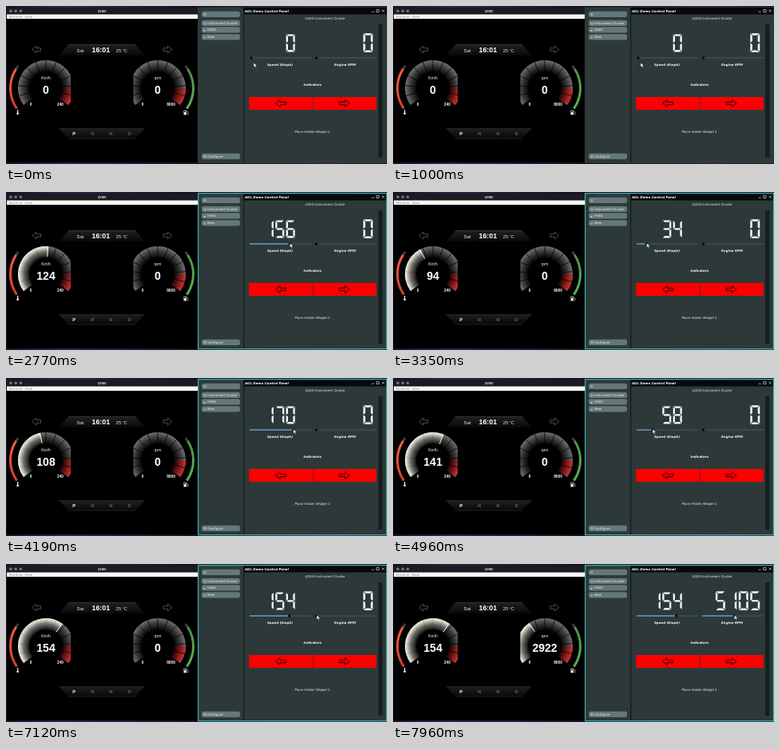
These frames come from a looping animation (477x198 px, 8000 ms). An HTML page:

```html
<!DOCTYPE html>
<html lang="en">
<head>
<meta charset="utf-8">
<title>Instrument cluster demo</title>
<style>
html, body { margin: 0; width: 100%; height: 100%; overflow: hidden; background: #0b0a12; }
svg { display: block; width: 100vw; height: 100vh; font-family: "Liberation Sans", Arial, sans-serif; }
.ui { font-family: "DejaVu Sans", sans-serif; font-size: 4px; }
.mid { text-anchor: middle; }
.bold { font-weight: bold; }
.it { font-style: italic; }
</style>
</head>
<body>
<svg id="stage" viewBox="0 0 477 198">
  <defs>
    <linearGradient id="wall"><stop offset="0" stop-color="#171129"/><stop offset=".15" stop-color="#33204a"/><stop offset=".5" stop-color="#141124"/><stop offset=".85" stop-color="#33204a"/><stop offset="1" stop-color="#1d1630"/></linearGradient>
    <linearGradient id="plate" x2="0" y2="1"><stop offset="0" stop-color="#202020"/><stop offset="1" stop-color="#080808"/></linearGradient>
    <linearGradient id="heat" x2="0" y2="1"><stop offset="0" stop-color="#ff6048"/><stop offset="1" stop-color="#d63c2c"/></linearGradient>
    <linearGradient id="fuel" x2="0" y2="1"><stop offset="0" stop-color="#4b9348"/><stop offset="1" stop-color="#5bb057"/></linearGradient>
    <clipPath id="kmhClip"><path d="M0 60H81V140H0Z"/></clipPath>
    <clipPath id="rpmClip"><path d="M159.5 60H240V140H159.5Z"/></clipPath>
  </defs>
  <rect width="477" height="198" fill="url(#wall)"/>

  <g id="cluster">
    <rect x="1" y="2" width="239" height="194" fill="#000"/>
    <rect x="1" y="2" width="239" height="8.5" fill="#1b1b20"/>
    <g fill="#75757c"><circle cx="6" cy="6.2" r="1.8"/><circle cx="12.2" cy="6.2" r="1.8"/><circle cx="18.4" cy="6.2" r="1.8"/></g>
    <text class="mid bold" x="120.2" y="7.6" fill="#ddd" font-family="Inter, sans-serif" font-size="3.5">QEMU</text>
    <rect x="1" y="10.5" width="239" height="5.5" fill="#f8f8f8"/>
    <text class="ui" y="14.7" fill="#8a8a8a"><tspan x="3.7">Machine</tspan><tspan x="23.5">View</tspan></text>

    <path d="M66 62 78 48.5H162L174 62Z" fill="url(#plate)"/>
    <path d="M78 48.5H162" stroke="#484848" stroke-width=".6"/>
    <path d="M66 153H174L162 166H78Z" fill="url(#plate)"/>
    <path d="M78 166H162" stroke="#383838" stroke-width=".6"/>
    <g class="mid" fill="#eee">
      <text x="93" y="57.7" font-size="6">Sat</text>
      <text class="bold" x="118.8" y="58.2" font-size="8.8" fill="#fff">16:01</text>
      <text x="144.8" y="57.5" font-size="5.6">25 °C</text>
    </g>
    <g class="mid bold" font-size="5.8" fill="#626262">
      <text x="85.3" y="161.7" fill="#fff">P</text><text x="108.3" y="161.7">R</text><text x="131.3" y="161.7">N</text><text x="154.7" y="161.7">D</text>
    </g>
    <g fill="none" stroke="#606060" stroke-width=".8" stroke-linejoin="round">
      <path d="M32.7 54.5 38 50V52.7H43.5V56.3H38V59Z"/>
      <path d="M207.7 54.5 202.4 50V52.7H196.9V56.3H202.4V59Z"/>
    </g>
    <g id="gauges"></g>
    <g fill="#eee">
      <path d="M14 130h1.2v3.4a1.4 1.4 0 1 1-1.2 0Z"/>
      <path d="M222.5 130.8h3.4v5.6h-3.4z"/>
      <path d="M226.2 131.8l1.6 1v3.1h-1.2" fill="none" stroke="#eee" stroke-width=".6"/>
      <path d="M223.2 131.5h2v1.5h-2z" fill="#000"/>
    </g>
  </g>

  <g id="panel">
    <rect x="240" y="1.5" width="237" height="195.5" fill="#2d3939"/>
    <rect x="297" y="2" width="1.3" height="194" fill="#141b1c"/>
    <rect x="298" y="2" width="178.5" height="8.5" fill="#07090a"/>
    <text class="ui bold it" x="299" y="7.7" fill="#fff">AGL Demo Control Panel</text>
    <path d="M457.7 7.2h3M463.8 4.6h3.2v3h-3.2zM470.7 4.6l3 3m0-3-3 3" fill="none" stroke="#ddd" stroke-width=".7"/>
    <g id="menu" class="ui"></g>
    <rect x="466.2" y="23" width="5.2" height="167" fill="#151d21"/>
    <g class="ui mid" fill="#f0f3f3">
      <text x="399.5" y="17.3">LOGO Instrument Cluster</text>
      <g class="bold it">
        <text x="343" y="74.8">Speed (Kmph)</text><text x="424.5" y="74.8">Engine RPM</text><text x="383.8" y="99.8">Indicators</text>
      </g>
      <text class="it" x="383.7" y="159.1">Place Holder Widget 1</text>
    </g>
    <path d="M304.3 113.9h79.4v16h-79.4zM384.5 113.9h79.2v16h-79.2z" fill="#fe0000"/>
    <g fill="none" stroke="#190000" stroke-width=".9" stroke-linejoin="round">
      <path d="M337.5 122 343 117.5V120.3H350.5V123.7H343V126.5Z"/>
      <path d="M430 122 424.5 117.5V120.3H417V123.7H424.5V126.5Z"/>
    </g>
    <path d="M305 65h77.5M387 65h76.5" stroke="#4b5859" stroke-width="1.2"/>
    <g stroke="#6691cd" stroke-width="1.4"><path id="speedBar"/><path id="revBar"/></g>
    <g fill="#080b0c"><circle id="speedKnob" cy="65" r="1.7"/><circle id="revKnob" cy="65" r="1.7"/></g>
    <g fill="#f8fafa"><g id="speedLcd"/><g id="revLcd"/></g>
    <rect id="focus" x="240.6" y="1.7" width="235.9" height="195" fill="none" stroke="#3bb3ac" stroke-width="1.2"/>
  </g>
  <path id="cursor" d="M0 0V5.6L1.4 4.4 2.4 6.6 3.5 6.1 2.5 4H4.3Z" fill="#fff" stroke="#10191a" stroke-width=".5"/>
</svg>
<script>
const $ = id => document.getElementById(id);
const LOOP = 8000, START = 143, SPAN = 254, END = START + SPAN, CY = 103;
const INNER = 21, OUTER = 35;

// [time, value] pairs
const speedKeys = [[2020, 0], [2310, 81], [2700, 156], [2860, 156], [3350, 34], [3530, 20], [4190, 170], [4380, 176], [4960, 58], [5160, 44], [5780, 154]];
const speedNeedle = [[2180, 0], [2310, 14], [2560, 82], [2960, 143], [3350, 94], [3740, 38], [4190, 108], [4620, 168], [4960, 141], [5390, 58], [5740, 112], [6080, 148], [6190, 150], [6420, 150], [6650, 154]];
const revKeys = [[7460, 0], [7700, 2150], [7960, 5105]];
const revNeedle = [[7520, 0], [7700, 820], [7960, 2922]];
const cursorX = [[380, 310], [680, 423], [1000, 310], [1650, 310], [1950, 307]];
const cursorY = [[380, 71], [680, 76], [1000, 71], [1650, 71], [1950, 64]];
const crossX = [[6420, 354.7], [7120, 389]];

// Monotone cubic through the keys, flat at turning points
function track(keys, t) {
  const last = keys.length - 1;
  if (t <= keys[0][0]) return keys[0][1];
  if (t >= keys[last][0]) return keys[last][1];
  const i = keys.findIndex(k => k[0] > t) - 1;
  const slope = j => (keys[j + 1][1] - keys[j][1]) / (keys[j + 1][0] - keys[j][0]);
  const tangent = j => {
    if (j === 0 || j === last) return 0;
    const a = slope(j - 1), b = slope(j);
    return a * b > 0 ? 2 * a * b / (a + b) : 0;
  };
  const [t0, a] = keys[i], [t1, b] = keys[i + 1];
  const h = t1 - t0, u = (t - t0) / h, w = u * u * (3 - 2 * u);
  return a + (b - a) * w + h * u * (1 - u) * (tangent(i) * (1 - u) - tangent(i + 1) * u);
}

const polar = (cx, r, deg) => {
  const a = deg * Math.PI / 180;
  return `${(cx + r * Math.cos(a)).toFixed(2)} ${(CY + r * Math.sin(a)).toFixed(2)}`;
};
const arc = (cx, r, a, b) => `M${polar(cx, r, a)}A${r} ${r} 0 ${b - a > 180 ? 1 : 0} 1 ${polar(cx, r, b)}`;
const sector = (cx, r0, r1, a, b) =>
  `${arc(cx, r1, a, b)}L${polar(cx, r0, b)}A${r0} ${r0} 0 ${b - a > 180 ? 1 : 0} 0 ${polar(cx, r0, a)}Z`;

function radial(id, cx, stops) {
  return `<radialGradient id="${id}" gradientUnits="userSpaceOnUse" cx="${cx}" cy="${CY}" r="${OUTER}">` +
    stops.map(([o, c]) => `<stop offset="${o}" stop-color="${c}"/>`).join('') + '</radialGradient>';
}

function gaugeMarkup(id, cx, unit, max, maxX) {
  let ticks = '';
  for (let i = 1; i < 12; i++) {
    const a = START + SPAN * i / 12;
    ticks += `M${polar(cx, INNER, a)}L${polar(cx, OUTER + .5, a)}`;
  }
  return radial(id + 'Dark', cx, [[.6, '#080808'], [.8, '#353535'], [1, '#707070']]) +
    radial(id + 'Red', cx, [[.6, '#230202'], [1, '#cf3030']]) +
    radial(id + 'Lit', cx, [[.6, '#141414'], [.8, '#707069'], [.92, '#c9c9be'], [1, '#f4f4e8']]) +
    `<g clip-path="url(#${id}Clip)">
      <path d="${sector(cx, INNER, OUTER, START, END)}" fill="url(#${id}Dark)"/>
      <path d="${sector(cx, INNER, OUTER, END - 37, END)}" fill="url(#${id}Red)"/>
      <path d="${ticks}" stroke="#000" stroke-width=".7"/>
      <path id="${id}Fill" fill="url(#${id}Lit)"/>
      <path d="${ticks}" stroke="#000" stroke-width=".5" opacity=".25"/>
      <path id="${id}Hand" stroke="#fff" stroke-width="1"/>
    </g>
    <g class="mid bold" fill="#fff">
      <text x="${cx}" y="92" font-size="5" font-weight="normal">${unit}</text>
      <text id="${id}Text" x="${cx}" y="109.6" font-size="14"></text>
      <text x="${cx - 19}" y="125" font-size="4.8">0</text>
      <text x="${maxX}" y="125" font-size="4.8">${max}</text>
    </g>`;
}

$('gauges').innerHTML = gaugeMarkup('kmh', 50, 'Km/h', 240, 68) + gaugeMarkup('rpm', 190, 'rpm', 8000, 206.5) +
  `<path d="${sector(50, 43, 46, 213, 219)}${sector(190, 43, 46, -39, -33)}" fill="#3c3c3c"/>
   <path d="${sector(50, 43, 46, 145, 213)}" fill="url(#heat)"/>
   <path d="${sector(190, 43, 46, -33, 35)}" fill="url(#fuel)"/>`;

$('menu').innerHTML = [[6.8, '', '≡'], [17.8, 'Instrument Cluster', '◎'], [26.3, 'HVAC', '◂'], [35.3, 'New', '+'], [184.7, 'Configure', '⚙']]
  .map(([y, label, icon]) => `<rect x="245" y="${y}" width="48" height="7.2" rx="2.5" fill="#657879"/>
    <g fill="#f2f6f6"><text x="247" y="${y + 5.2}" font-size="4.5">${icon}</text>
    <text x="252.3" y="${y + 5.1}">${label}</text></g>`).join('');

// Seven-segment digit in an 11 x 22 cell, bits a..g
const SEGS = ['M.6 0H10.4L8.1 2.3H2.9Z', 'M11 .6V10.6L8.7 9.2V2.9Z', 'M11 11.4V21.4L8.7 19.1V12.8Z', 'M2.9 19.7H8.1L10.4 22H.6Z',
  'M0 11.4 2.3 12.8V19.1L0 21.4Z', 'M0 .6 2.3 2.9V9.2L0 10.6Z', 'M.8 11 2.6 9.9H8.4L10.2 11 8.4 12.1H2.6Z'];
const DIGITS = [63, 6, 91, 79, 102, 109, 125, 7, 127, 111];
const lcd = (value, right, top, scale) => [...String(value)].reverse().map((digit, i) => {
  const shape = SEGS.filter((s, bit) => DIGITS[digit] >> bit & 1).join('');
  const x = right - (11 + i * 13.4) * scale;
  return `<path transform="translate(${x} ${top}) scale(${scale})" d="${shape}"/>`;
}).join('');

function setGauge(id, cx, value, max) {
  const a = START + SPAN * value / max, lit = value > .5;
  $(id + 'Fill').setAttribute('d', lit ? sector(cx, INNER, OUTER, START, a) : '');
  $(id + 'Hand').setAttribute('d', lit ? `M${polar(cx, INNER + 1, a)}L${polar(cx, OUTER, a)}` : '');
  $(id + 'Text').textContent = Math.round(value);
}

function setSlider(id, left, x, value, ...place) {
  $(id + 'Bar').setAttribute('d', value > .5 ? `M${left} 65H${x}` : '');
  $(id + 'Knob').setAttribute('cx', x);
  $(id + 'Lcd').innerHTML = lcd(Math.round(value), ...place);
}

function draw(t) {
  const speed = track(speedKeys, t), rev = track(revKeys, t);
  const speedX = 307 + speed * .31, revX = 388.5 + rev * .0076;
  setSlider('speed', 305, speedX, speed, 361.7, 35.4, 1);
  setSlider('rev', 387, revX, rev, 459.2, 34.2, 1.08);
  setGauge('kmh', 50, track(speedNeedle, t), 240);
  setGauge('rpm', 190, track(revNeedle, t), 8000);
  $('focus').style.display = t < 1650 ? 'none' : '';
  const x = t < 2020 ? track(cursorX, t) : t < 6420 ? speedX : t < 7460 ? track(crossX, t) : revX;
  $('cursor').setAttribute('transform', `translate(${x.toFixed(2)} ${track(cursorY, t).toFixed(2)})`);
}

const began = performance.now();
function tick() {
  draw((performance.now() - began) % LOOP);
  requestAnimationFrame(tick);
}
tick();
</script>
</body>
</html>
```
